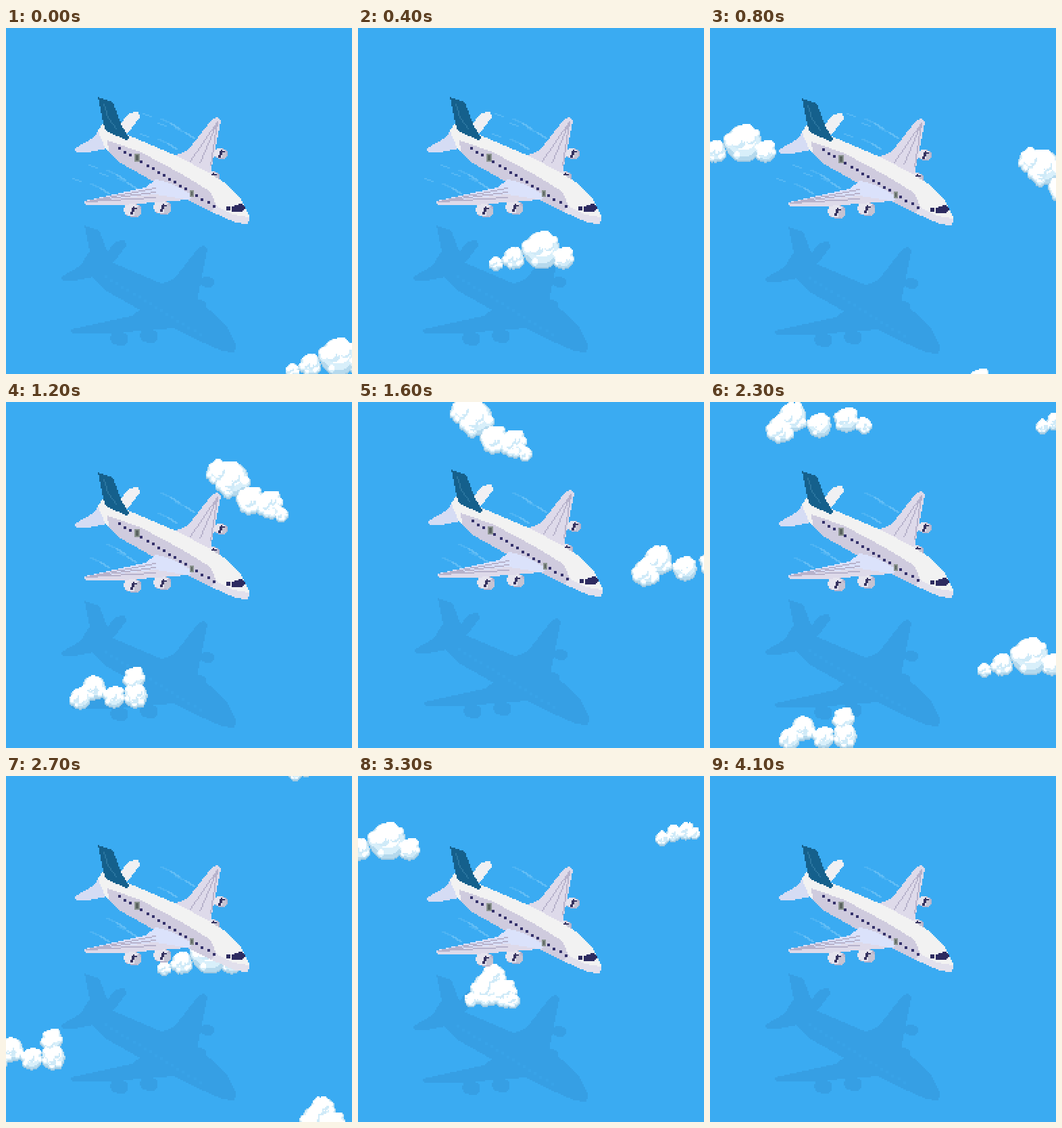
Animation of 512 by 512 pixels, one loop 4200 ms. Source, as an HTML page with a canvas:

```html
<!DOCTYPE html>
<html lang="en">
<head>
<meta charset="utf-8">
<title>Airliner</title>
<style>
  html, body { margin: 0; width: 100%; height: 100%; overflow: hidden; background: #3aabf2; }
  canvas { display: block; width: 100%; height: 100%; image-rendering: pixelated; }
</style>
</head>
<body>
<canvas id="stage" width="256" height="256"></canvas>
<script>
const SIZE = 256, STEP = 100, STEPS = 42, MARGIN = 8;
const SKY = '#3aabf2', SEAM = '#b7b2cb', LILAC = '#dedaea', INK = '#35325f';
const ctx = document.getElementById('stage').getContext('2d');

function layer(w = SIZE, h = SIZE) {
  const c = document.createElement('canvas');
  c.width = w;
  c.height = h;
  return c.getContext('2d');
}

function dot(g, x, y, color, w = 1, h = 1) {
  g.fillStyle = color;
  g.fillRect(x, y, w, h);
}

// Polygons are filled cell by cell so that their edges stay hard.
function poly(g, points, color) {
  const n = points.match(/-?[\d.]+/g).map(Number);
  const xs = n.filter((_, i) => i % 2 === 0), ys = n.filter((_, i) => i % 2);
  const path = new Path2D('M' + points + 'Z');
  for (let x = Math.floor(Math.min(...xs)); x <= Math.max(...xs); x++)
    for (let y = Math.floor(Math.min(...ys)); y <= Math.max(...ys); y++)
      if (g.isPointInPath(path, x + .5, y + .5)) dot(g, x, y, color);
}

function ellipse(g, cx, cy, rx, ry, color) {
  for (let y = Math.round(cy - ry); y < cy + ry; y++) {
    const half = rx * Math.sqrt(Math.max(0, 1 - ((y + .5 - cy) / ry) ** 2));
    const left = Math.round(cx - half);
    dot(g, left, y, color, Math.round(cx + half) - left);
  }
}

const disc = (g, x, y, r, color) => ellipse(g, x, y, r, r, color);

function line(g, x0, y0, x1, y1, color, width = 1) {
  const n = Math.max(Math.abs(x1 - x0), Math.abs(y1 - y0));
  for (let i = 0; i <= n; i++)
    dot(g, Math.round(x0 + (x1 - x0) * i / n), Math.round(y0 + (y1 - y0) * i / n), color, width);
}

function engine(g, x, y, r) {
  ellipse(g, x, y, r, r * .75, SEAM);
  ellipse(g, x - 1, y - .5, r - .5, r * .7, '#e6e4ee');
  ellipse(g, x + r * .5, y + 1, r * .4, r * .55, '#c6c3d2');
  line(g, x - 1, y - 2, x - 2, y + 2, INK, 2);
  line(g, x, y - 3, x + 2, y - 2, INK);
}

function windows(g, color) {
  for (let i = 0; i < 18; i++) dot(g, 83 + Math.round(i * 4.1), 88 + Math.round(i * 2.5), color, 2, 2);
}

function door(g, x, y, w, h) {
  dot(g, x, y, '#8b948f', w, h);
  dot(g, x + 1, y + 1, '#5a625f', w - 2, h - 2);
}

function drawPlane(g) {
  // Far wing
  engine(g, 159, 93, 5);
  engine(g, 153, 110, 5);
  poly(g, '122,96 135,90 152,68 156,66 159,68 155,88 151,108 146,107', LILAC);
  for (const root of [136, 143, 151]) line(g, 156, 69, root, 64 + root / 4, SEAM);
  // Tailplane
  poly(g, '83,73 91,63 98,62 99,66 90,78', '#f0f0f3');
  poly(g, '69,75 65,81 51,89 52,92 60,92 75,89 81,85', '#d5dcf4');
  // Body
  poly(g, '68,76 72,70 90,79 127,95 150,107 164,116 174,127 180,139 179,145 170,144 152,136 117,118 85,100 74,90', '#f2f2f2');
  poly(g, '75,83 100,92 130,108 151,121 156,132 152,136 117,118 85,100 76,91', '#cfcbde');
  poly(g, '156,132 168,138 180,140 179,145 170,144 152,136', '#e2e0ec');
  // Fin
  poly(g, '68,51 79,55 86,73 91,81 89,83 74,76 72,70', '#15608c');
  line(g, 72, 56, 75, 66, '#2b759f');
  line(g, 75, 66, 81, 74, '#2b759f');
  // Near wing
  engine(g, 94, 135, 6.5);
  engine(g, 116, 133, 6.5);
  poly(g, '58,128 103,118 111,112 122,115 139,124 135,127 85,131 60,131', '#dbe2fb');
  poly(g, '58,129 110,123 134,127 85,131 60,131', LILAC);
  for (const root of [118, 121, 125]) line(g, 59, 128, 110, root, SEAM);
  // Doors and glass
  windows(g, '#35326c');
  door(g, 95, 93, 4, 6);
  door(g, 136, 120, 3, 5);
  poly(g, '167,132 174,130 177,133 174,136 167,136', '#2d2b60');
  dot(g, 163, 132, '#2d2b60', 3, 3);
}

const plane = layer(), shadow = layer();
drawPlane(plane);
shadow.drawImage(plane.canvas, 0, 0);
shadow.globalCompositeOperation = 'source-in';
dot(shadow, 0, 0, '#369fe4', SIZE, SIZE);
shadow.globalCompositeOperation = 'source-atop';
windows(shadow, '#38a3e8');

function seeded(seed) {
  return () => {
    const v = Math.sin(seed++ * 127.1) * 43758.5453;
    return v - Math.floor(v);
  };
}

// Each lobe [x, y, r] grows small puffs round its rim; paler tones shrink towards the lit top.
function makeCloud(...lobes) {
  const g = layer(110, 70), rand = seeded(lobes[0][0]);
  g.translate(MARGIN, MARGIN);
  const puffs = lobes.flatMap(([x, y, r]) => [[x, y, r * .95], ...Array.from({ length: 9 }, () => {
    const a = rand() * Math.PI * 2;
    return [x + r * .75 * Math.cos(a), y + r * .75 * Math.sin(a), r * (.2 + .18 * rand())];
  })]);
  const tones = [['#9fc8e1', 0, 0], ['#b5d9ed', 0, 1], ['#d8effa', .12, 1], ['#ffffff', .3, 1]];
  for (const [color, shrink, lift] of tones)
    for (const [x, y, r] of puffs) disc(g, x, y - r * shrink - lift, r * (1 - shrink), color);
  for (const [x, y, r] of lobes)
    for (let i = 0; i < 3; i++) {
      const px = x + r * (rand() - .5), py = y + r * (rand() * .8 - .3), q = r * .28;
      disc(g, px, py, q, '#cfeaf8');
      disc(g, px - 1, py - 1.5, q, '#ffffff');
    }
  return g.canvas;
}

const wedge = makeCloud([9, 24, 5], [22, 20, 8], [43, 14, 14], [59, 20, 8]);
const bank = makeCloud([11, 21, 10], [20, 12, 11], [40, 18, 9], [60, 14, 9], [73, 18, 6]);
const slope = makeCloud([10, 9, 9], [20, 14, 13], [34, 29, 10], [48, 32, 10], [57, 40, 5]);
const twin = makeCloud([21, 15, 9], [11, 23, 8], [36, 22, 8], [51, 8, 8], [52, 21, 9]);
const peak = makeCloud([24, 9, 9], [20, 18, 12], [32, 21, 10], [8, 26, 5], [39, 27, 5]);
const puff = makeCloud([8, 13, 5], [17, 9, 6], [26, 7, 6], [32, 9, 4]);

// Shape, step, place at that step, speed per step
const clouds = [
  [wedge, 0, 203, 230, -27.6, -19.7],
  [slope, 8, 227, 90, -20, -11.4],
  [twin, 8, 149, 253, -26.2, -14.1],
  [bank, 16, 202, 106, -23, -15.2],
  [puff, 23, 238, 6, -8, -5.1],
  [twin, 23, 48, 227, -16.2, -9.8],
  [wedge, 23, 194, 175, -21.5, -14],
  [peak, 27, 210, 238, -22.3, -16.4],
  [puff, 33, 217, 34, -17.4, -10.5],
];

function drawTrail(step) {
  const heads = [[125, 74], [112, 82], [114, 67], [82, 111], [62, 115], [74, 105]];
  for (const [x, y] of heads) {
    line(ctx, x, y, x + 5, y + 2, '#4db4f4', 2);
    line(ctx, x + 7, y + 3, x + 13, y + 7, '#62bef6', 2);
    if (step < 12) line(ctx, x - 13, y - 4, x - 7, y - 2, '#55b8f5');
  }
}

// Light turbulence: a dip, then a small jolt forward
function sway(step) {
  const s = step % 21;
  return s >= 7 && s <= 13 ? [0, 1] : s >= 15 && s <= 18 ? [1, -1] : [0, 0];
}

function draw(now) {
  const step = Math.floor(now / STEP) % STEPS;
  const [dx, dy] = sway(step);
  dot(ctx, 0, 0, SKY, SIZE, SIZE);
  ctx.drawImage(shadow.canvas, dx - 10, dy + 95);
  for (const [shape, start, x, y, vx, vy] of clouds) {
    const k = step - start;
    ctx.drawImage(shape, Math.round(x + vx * k) - MARGIN, Math.round(y + vy * k) - MARGIN);
  }
  drawTrail(step);
  ctx.drawImage(plane.canvas, dx, dy);
}

function loop() {
  draw(performance.now());
  requestAnimationFrame(loop);
}
loop();
</script>
</body>
</html>
```
